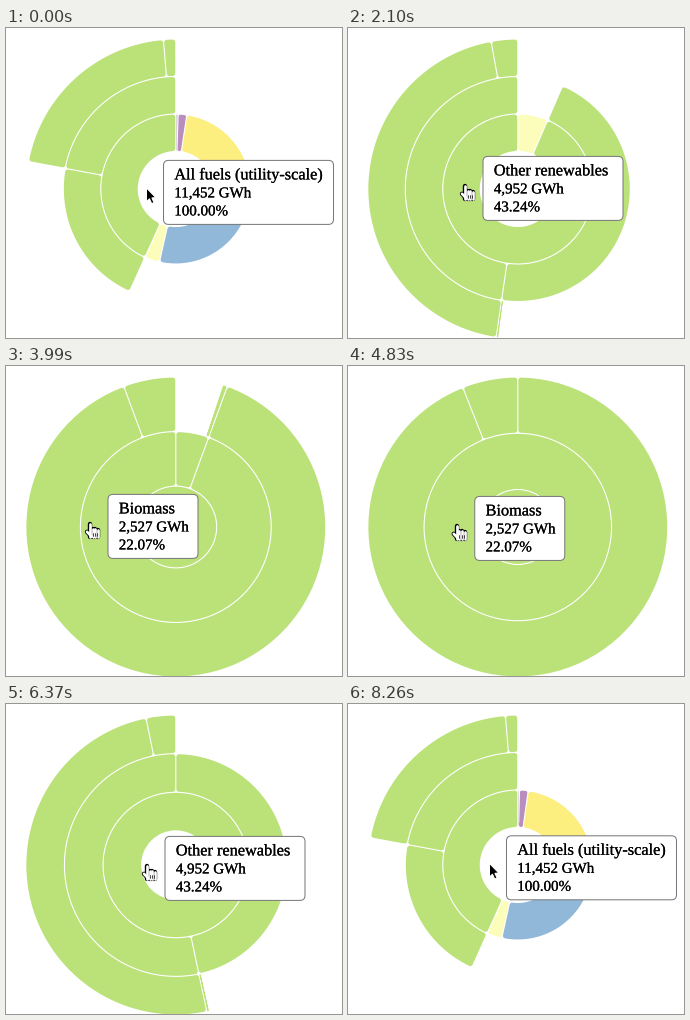
Animation of 336x310 px, one loop 8.33 s. Source, as a matplotlib script:

```python
import numpy as np
import matplotlib.pyplot as plt
from matplotlib.animation import FuncAnimation
from matplotlib.patches import Circle, FancyBboxPatch, Polygon, Wedge
from matplotlib.patheffects import withStroke

W, H, DPI = 336, 310, 100
PX = 72 / DPI
STEP, FRAMES = 70, 119
CENTER, RADIUS, HOLE = np.array([169.8, 161.0]), 150, 37.5
GAP, CORNER = 0.55, 2.5
ZOOM_MS, CLICK_MS = 1000, 210

GREEN, BLUE, YELLOW = "#bbe179", "#91b8d9", "#fdee80"
PALE, PURPLE, GREY = "#fdfdbb", "#b98dbd", "#d2cdd2"

# nested (GWh, colour, children); a node without colour only takes up room
FUELS = [
    (57, GREY, []),
    (212, PURPLE, []),
    (2937, YELLOW, []),
    (2920, BLUE, []),
    (374, PALE, []),
    (4952, GREEN, [
        (2425, GREEN, [(2411, None, []), (14, GREEN, [])]),
        (2527, GREEN, [(2376, GREEN, []), (151, GREEN, [])]),
    ]),
]
TOTAL, RENEWABLE, BIOMASS = 11452, 4952, 2527

# tooltip lines and width, by ring from the centre outwards
TOOLTIPS = [
    ("All fuels (utility-scale)", "11,452 GWh", "100.00%", 170),
    ("Other renewables", "4,952 GWh", "43.24%", 140),
    ("Biomass", "2,527 GWh", "22.07%", 90),
]

# view: first visible fraction, first visible depth, radius of that depth
ROOT_VIEW = np.array([0, 0, 0])
RENEW_VIEW = np.array([1 - RENEWABLE / TOTAL, 0.25, HOLE])
BIO_VIEW = np.array([1 - BIOMASS / TOTAL, 0.5, HOLE])

# click, start of the zoom, radius of the click ring, new view
ZOOMS = [
    (1330, 1337, 31, RENEW_VIEW),
    (3150, 3239, 31, BIO_VIEW),
    (5530, 5650, 31, RENEW_VIEW),
    (7280, 7345, 24, ROOT_VIEW),
]

# start, end and destination of each pointer move
HOME = np.array([140.5, 160])
MOVES = [
    (630, 1120, (118, 156)),
    (2380, 3010, (85, 156)),
    (4340, 5390, (140, 160.5)),
    (5530, 5740, (142, 160)),
    (6370, 6440, (141.5, 159.4)),
]
ARROW = [(0, 0), (0, 13.5), (3, 10.8), (5.2, 15.6), (7.5, 14.6), (5.4, 9.9), (9.3, 9.6)]

fig = plt.figure(figsize=(W / DPI, H / DPI), dpi=DPI, facecolor="white")
ax = fig.add_axes([0, 0, 1, 1])


def partition(nodes, start=0, ring=1):
    """Yield start, end, ring and colour of every coloured node."""
    for value, color, children in nodes:
        end = start + value / TOTAL
        if color:
            yield start, end, ring, color
        yield from partition(children, start, ring + 1)
        start = end


def smooth(t):
    t = np.clip(t, 0, 1)
    return t * t * (3 - 2 * t)


def cubic_in_out(t):
    t = np.clip(t, 0, 1)
    return 4 * t**3 if t < 0.5 else 1 - 4 * (1 - t)**3


def view_at(ms):
    view = ROOT_VIEW
    for _, start, _, target in ZOOMS:
        view = view + (target - view) * cubic_in_out((ms - start) / ZOOM_MS)
    return view


def settled_view(ms):
    done = [target for _, start, _, target in ZOOMS if ms >= start + ZOOM_MS]
    return done[-1] if done else ROOT_VIEW


def pointer_at(ms):
    tip = HOME
    for start, end, goal in MOVES:
        tip = tip + (goal - tip) * smooth((ms - start) / (end - start))
    return tip


def hovered_ring(ms, tip):
    """Ring under the pointer; it is not looked up anew until a zoom has ended."""
    _, depth, base = settled_view(ms)
    r = np.hypot(*(tip - CENTER))
    return min(2, int(4 * (depth + (r - base) / (RADIUS - base) * (1 - depth))))


def arc(r, a, b):
    t = np.linspace(a, b, 90)
    return CENTER + r * np.column_stack([np.sin(t), -np.cos(t)])


def draw_segment(a, b, r0, r1, color):
    span = b - a
    if r1 * span < 1.5 or r1 - r0 < 1.5:
        return
    if span > 2 * np.pi - 1e-3:
        inner = r0 + GAP if r0 > 0 else 0
        ax.add_patch(Wedge(CENTER, r1 - GAP, 0, 360, width=r1 - GAP - inner, fc=color, lw=0))
        return
    # an inset shape with a round-joined edge of its own colour gives round corners
    corner = np.clip(min(r0 * span, r1 - r0) / 2 - GAP, 0.3, CORNER)
    inset = corner + GAP

    def side(r):
        shift = min(np.arcsin(min(inset / r, 1)), span / 2)
        return arc(r, a + shift, b - shift)

    outline = np.vstack([side(r1 - inset), side(r0 + inset)[::-1]])
    ax.add_patch(Polygon(outline, fc=color, ec=color, lw=2 * corner * PX, joinstyle="round"))


def draw_chart(ms):
    first, depth, base = view_at(ms)

    def angle(x):
        return 2 * np.pi * np.clip((x - first) / (1 - first), 0, 1)

    def radius(y):
        return max(0, base + (y - depth) / (1 - depth) * (RADIUS - base))

    for x0, x1, ring, color in partition(FUELS):
        draw_segment(angle(x0), angle(x1), radius(ring / 4), radius((ring + 1) / 4), color)


def draw_tooltip(tip, tooltip):
    *lines, width = tooltip
    left, top = tip[0] + 17, tip[1] - 27.6
    ax.add_patch(FancyBboxPatch((left, top), width, 64, boxstyle="round,pad=0,rounding_size=5",
                                fc="white", ec="#777777", lw=PX, zorder=2))
    for i, line in enumerate(lines):
        ax.text(left + 10.8, top + 19 + 18 * i, line, family="Liberation Serif",
                size=(16.3 if i == 0 else 15) * PX, color="black", va="baseline", zorder=3,
                path_effects=[withStroke(linewidth=0.15, foreground="black")])


def stroke(points, width, color):
    ax.plot(*np.transpose(points), color=color, lw=width * PX, zorder=4,
            solid_capstyle="round", solid_joinstyle="round")


def draw_hand(tip):
    fingers = [[(x, top), (x, 14.5)] for x, top in zip(np.arange(-1, 8, 2.6), (1.5, 6.5, 7, 8))]
    thumb = [(-4, 9.8), (0.5, 14.5)]
    for width, color in ((4.4, "black"), (2.7, "white")):
        for line in [*fingers, thumb]:
            stroke(line, width, color)
    for x in (1.7, 4, 6.3):
        stroke([(x, 11), (x, 14)] + np.array([0, 0]), 0.7, "black")


def draw_pointer(tip, hand):
    if not hand:
        ax.add_patch(Polygon(ARROW + tip, fc="black", ec="white", lw=PX, joinstyle="round",
                             zorder=4))
        return
    knuckles = zip(np.arange(-1, 8, 2.6), (1.5, 6.5, 7, 8))
    lines = [np.array([(x, y), (x, 14.5)]) for x, y in knuckles]
    lines.append(np.array([(-4, 9.8), (0.5, 14.5)]))
    for width, color in ((4.4, "black"), (2.7, "white")):
        for line in lines:
            stroke(line + tip, width, color)
    for x in (1.7, 4, 6.3):
        stroke(np.array([(x, 11), (x, 14)]) + tip, 0.7, "black")


def draw(frame):
    ms = frame * STEP
    ax.cla()
    ax.set(xlim=(0, W), ylim=(H, 0))
    ax.axis("off")
    draw_chart(ms)
    tip = pointer_at(ms)
    ring = hovered_ring(ms, tip)
    draw_tooltip(tip, TOOLTIPS[ring])
    draw_pointer(tip, hand=ring > 0)
    for click, _, r, _ in ZOOMS:
        if click <= ms < click + CLICK_MS:
            ax.add_patch(Circle(tip - (0.5, 0), r, fill=False, ec="black", lw=1.4 * PX, zorder=5))
    return []


anim = FuncAnimation(fig, draw, frames=FRAMES, interval=STEP, repeat=True, repeat_delay=0)
plt.show()
```
